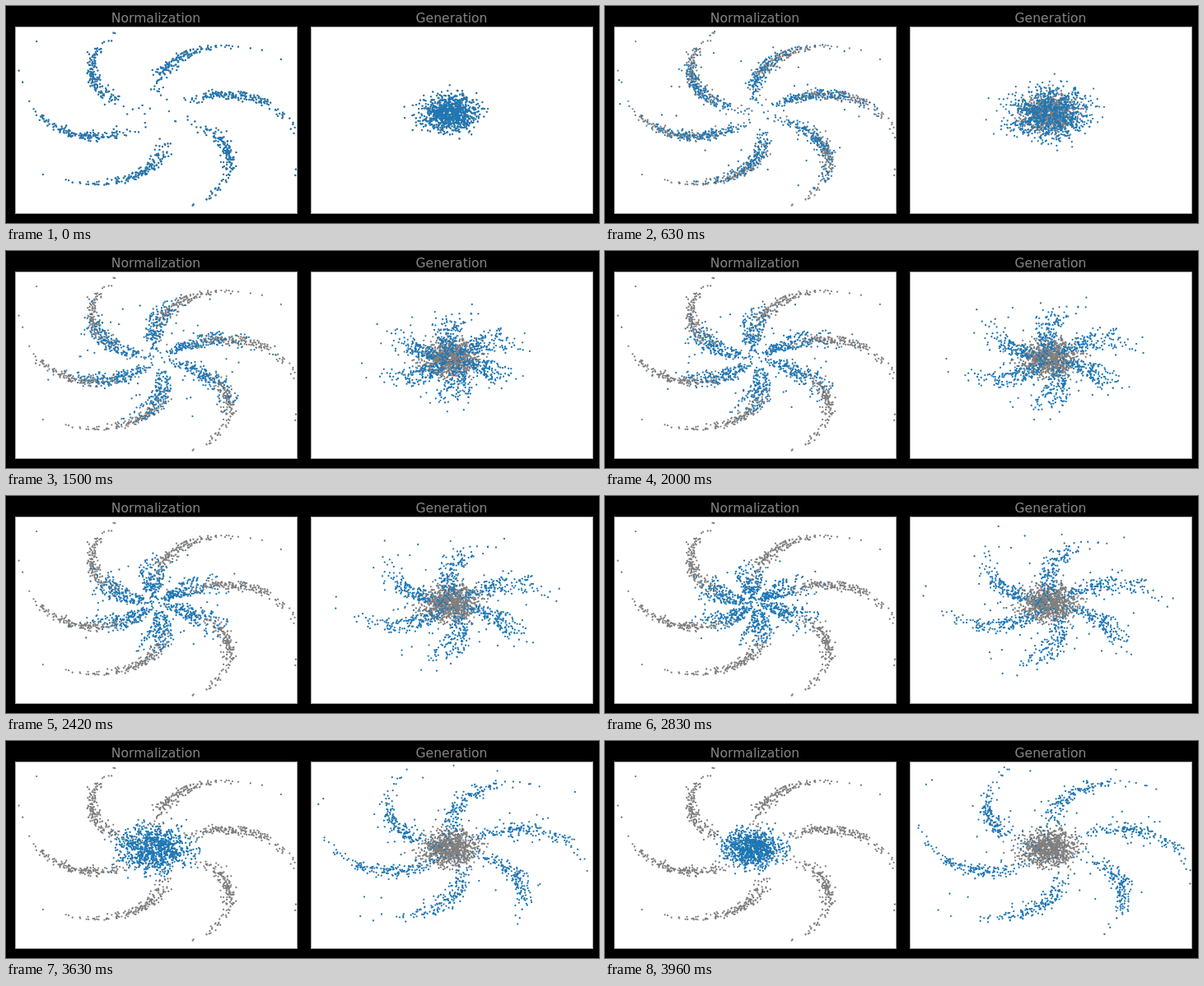
Write an HTML page with a canvas that moves like this. It is 720x264 px and loops after 5.62 s.

```html
<!DOCTYPE html>
<html lang="en">
<head>
<meta charset="utf-8">
<title>Normalization and generation</title>
<style>
  html, body { margin: 0; width: 100%; height: 100%; overflow: hidden; background: #000; }
  canvas { display: block; }
</style>
</head>
<body>
<canvas id="stage" width="720" height="264"></canvas>
<script>
const ctx = document.getElementById('stage').getContext('2d');
const LOOP = 5620, FPS = 24, LAST = 95;
const COUNT = 980, ARMS = 6, TWIST = 0.25;
const SX = 104, SY = 67, SIGMA = 0.163;
const BLUE = '#1f77b4', GRAY = '#7f7f7f';
const TAU = Math.PI * 2, SECTOR = TAU / ARMS;

function makeRandom(seed) {
  return () => {
    seed = (seed + 0x6d2b79f5) | 0;
    let x = Math.imul(seed ^ (seed >>> 15), 1 | seed);
    x = (x + Math.imul(x ^ (x >>> 7), 61 | x)) ^ x;
    return ((x ^ (x >>> 14)) >>> 0) / 4294967296;
  };
}

const lerp = (a, b, k) => a + (b - a) * k;
const sigmoid = n => 1 / (1 + Math.exp(-1.702 * n));

// Each point has a place on a pinwheel arm and a matching place in the blob.
function makePoints(seed, spread, strays) {
  const rand = makeRandom(seed);
  const gauss = () => Math.sqrt(-2 * Math.log(1 - rand())) * Math.cos(TAU * rand());
  return Array.from({ length: COUNT }, (_, i) => {
    const a = gauss(), b = gauss();
    const rank = sigmoid(a);
    const far = Math.max(0.12, 1 + 0.3 * a);
    const wide = (sigmoid(b) - 0.5) * SECTOR;
    const stray = rand() < strays;
    return {
      arm: (i % ARMS) * SECTOR,
      far,
      near: SIGMA * Math.sqrt(-2 * Math.log(1 - rank)),
      pull: 0.45 + 0.55 * rank,
      narrow: stray ? wide * 0.9 : spread * b / far,
      wide,
      drift: rand() < 0.05 ? (rand() - 0.5) * 1.2 : 0
    };
  });
}

// k = 0 is the pinwheel, k = 1 the blob; inner points collapse first.
function place(pt, k, left) {
  const r = lerp(pt.far, pt.near, k ** pt.pull);
  const angle = pt.arm - TWIST * Math.exp(r) + lerp(pt.narrow, pt.wide, k ** 1.5)
    + pt.drift * 4 * k * (1 - k);
  return [
    left + lerp(177, 168.5, k) + SX * r * Math.cos(angle),
    lerp(133, 130.5, k) - SY * r * Math.sin(angle)
  ];
}

const panels = [
  { title: 'Normalization', left: 11, from: 0, to: 1, points: makePoints(17, 0.05, 0) },
  { title: 'Generation', left: 370, from: 1, to: 0, points: makePoints(58, 0.065, 0.07) }
];

function drawDots(panel, k, color) {
  ctx.fillStyle = color;
  ctx.beginPath();
  for (const pt of panel.points) {
    const [x, y] = place(pt, k, panel.left);
    ctx.moveTo(x + 1.15, y);
    ctx.arc(x, y, 1.15, 0, TAU);
  }
  ctx.fill();
}

function drawTitle(text, x) {
  ctx.font = '15.6px "DejaVu Sans", sans-serif';
  ctx.textAlign = 'center';
  ctx.fillStyle = '#858585';
  ctx.fillText(text, x, 20);
}

function drawPanel(panel, progress) {
  const { left, from, to, title } = panel;
  ctx.fillStyle = '#fff';
  ctx.fillRect(left, 25, 343, 228);
  ctx.save();
  ctx.beginPath();
  ctx.rect(left, 25, 343, 228);
  ctx.clip();
  drawDots(panel, from, GRAY);
  drawDots(panel, lerp(from, to, progress), BLUE);
  ctx.restore();
  ctx.lineWidth = 1;
  ctx.strokeStyle = '#a0a0a0';
  ctx.strokeRect(left + 0.5, 25.5, 342, 227);
  drawTitle(title, left + 171);
}

const start = performance.now();
let shown = -1;

function render() {
  const t = (performance.now() - start) % LOOP;
  const step = Math.min(LAST, Math.floor((t + 4.9) * FPS / 1000));
  if (step !== shown) {
    shown = step;
    ctx.fillStyle = '#000';
    ctx.fillRect(0, 0, 720, 264);
    for (const panel of panels) drawPanel(panel, step / LAST);
  }
  requestAnimationFrame(render);
}
render();
</script>
</body>
</html>
```
